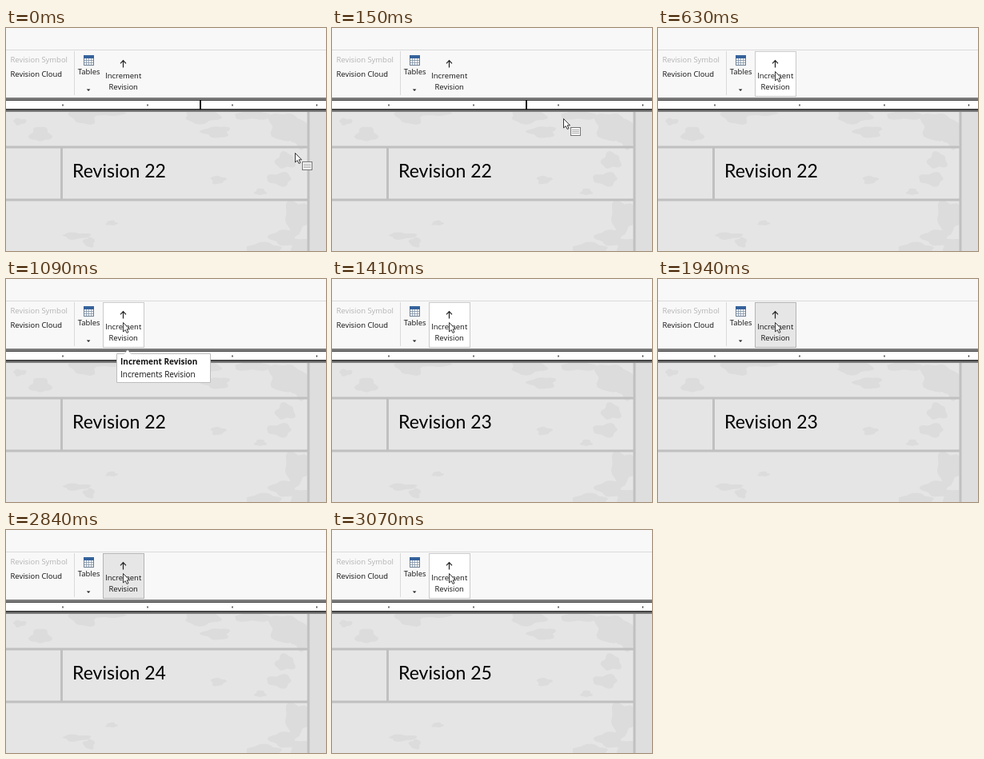
Animation, 400 px wide and 279 px high, one loop 3200 ms. Source, as an HTML page:

```html
<!DOCTYPE html>
<html lang="en">
<head>
<meta charset="utf-8">
<style>
  html, body { margin: 0; width: 100%; height: 100%; overflow: hidden; background: #f8f8f8; }
  svg { display: block; width: 100vw; height: 100vh; }
  text { font: 9.45px "Open Sans", "Noto Sans", sans-serif; fill: #111; }
  .mid { text-anchor: middle; }
  .tip text { font-size: 10px; }
  .tip .bold { font-weight: 700; }
  text.label { font: 23px Lato, "Open Sans", sans-serif; fill: #000; }
</style>
</head>
<body>
<svg viewBox="0 0 400 279">
  <defs><clipPath id="sheetClip"><rect y="105" width="377" height="174"/></clipPath></defs>

  <!-- Drawing sheet -->
  <rect y="104" width="400" height="175" fill="#e5e5e5"/>
  <rect x="379" y="104" width="21" height="175" fill="#dedede"/>
  <path id="stains" fill="#dcdcdc" clip-path="url(#sheetClip)"/>
  <path d="M0 149H378M0 215H378M69.5 149V215M378 104V279" fill="none" stroke="#c0c0c0" stroke-width="3"/>
  <text class="label" id="revision" x="83" y="187"></text>

  <!-- Toolbar -->
  <rect width="400" height="87" fill="#f8f8f8"/>
  <path d="M0 27.5H400M85.5 29V84" stroke="#dadada"/>
  <rect id="button" x="121.5" y="29.5" width="51" height="56"/>
  <text x="5.5" y="42.5" style="fill:#b4b4b4">Revision Symbol</text>
  <text x="5.5" y="61">Revision Cloud</text>
  <text class="mid" x="103.7" y="58">Tables</text>
  <text class="mid" x="146.7" y="63">Increment</text>
  <text class="mid" x="146.7" y="77">Revision</text>
  <g>
    <rect x="97.5" y="34.5" width="12" height="12" fill="#fff" stroke="#6d7f94"/>
    <rect x="97" y="34" width="13" height="4" fill="#35629b"/>
    <path d="M98 40.5H109M98 43.5H109M100.5 38V46M103.5 38V46M106.5 38V46" stroke="#8696a8" stroke-width=".8"/>
  </g>
  <path d="M100.8 76.5h4.6l-2.3 2.5z" fill="#222"/>
  <path d="M146.5 49.5V41M143 44.3L146.5 40.6L150 44.3" fill="none" stroke="#222" stroke-width="1.2"/>

  <!-- Ruler -->
  <rect y="87" width="400" height="18" fill="#7b7b7b"/>
  <rect y="90" width="400" height="13" fill="#444"/>
  <rect y="91" width="400" height="10" fill="#fff"/>
  <path d="M71 95.5v2M177 95.5v2M283 95.5v2M388.5 95.5v2" stroke="#222" stroke-width="1.3"/>
  <rect id="marker" x="242" y="90" width="2" height="12" fill="#111"/>

  <g id="tip" class="tip">
    <path d="M138.5 93.5H147.5L152 88.8L156.5 93.5H255.5V129.5H138.5Z" fill="#fff" stroke="#bdbdbd"/>
    <text class="bold" x="143" y="107">Increment Revision</text>
    <text x="143" y="122.5">Increments Revision</text>
  </g>

  <g id="cursor">
    <path d="M.5 .5V12L3.2 9.6L5.1 13.5L7 12.6L5.2 8.8H8.5Z" fill="#fff" stroke="#222" stroke-width=".9"/>
    <g id="badge">
      <rect x="9.5" y="11.5" width="12" height="10" fill="#f6f6f6" stroke="#777"/>
      <path d="M11 14.5H20M11 16.5H20M11 18.5H20" stroke="#aaa" stroke-width=".9"/>
    </g>
  </g>
</svg>
<script>
const LOOP = 3200, STEP = 30, ARRIVE = 630;
const $ = id => document.getElementById(id);
const show = (id, on) => $(id).setAttribute('visibility', on ? 'visible' : 'hidden');

// Paper stains: centre and radii, with a rippled edge.
const stains = [
  [43, 133, 13, 9], [17, 117, 8, 4], [98, 110, 17, 10], [128, 106, 20, 4],
  [245, 111, 22, 8], [263, 130, 17, 7], [308, 109, 22, 6], [350, 123, 22, 17],
  [368, 136, 12, 14], [349, 166, 12, 10], [265, 190, 9, 5], [342, 189, 15, 8],
  [318, 205, 7, 4], [88, 260, 17, 4], [104, 268, 7, 6], [132, 244, 7, 3],
  [364, 236, 16, 20], [348, 262, 17, 10], [322, 275, 22, 6], [370, 273, 16, 10]
];

function blob([x, y, rx, ry], seed) {
  const count = 26;
  return 'M' + Array.from({ length: count }, (_, i) => {
    const a = i / count * 2 * Math.PI;
    const r = 1 + .15 * Math.sin(3 * a + seed * 2.1) + .12 * Math.sin(5 * a + seed * 4.7);
    return `${(x + rx * r * Math.cos(a)).toFixed(1)} ${(y + ry * r * Math.sin(a)).toFixed(1)}`;
  }).join('L') + 'Z';
}
$('stains').setAttribute('d', stains.map(blob).join(''));

const clicks = [[1250, 1410], [1940, 2140], [2840, 3070]];

function draw(t) {
  const left = 1 - Math.min(Math.floor(t / STEP) * STEP / ARRIVE, 1);
  const x = Math.round(146 + 215 * left ** 1.5);
  const y = Math.round(54 + 102 * left ** 2);
  $('cursor').setAttribute('transform', `translate(${x} ${y})`);
  show('badge', y > 104);
  show('marker', y > 104);

  const pressed = clicks.some(([down, up]) => t >= down && t < up);
  show('button', t >= 570);
  $('button').setAttribute('fill', pressed ? '#e6e6e6' : '#fff');
  $('button').setAttribute('stroke', pressed ? '#b5b5b5' : '#cbcbcb');
  show('tip', t >= 1090 && t < 1250);
  $('revision').textContent = 'Revision ' + (22 + clicks.filter(([, up]) => t >= up).length);
}

const start = performance.now();
function tick() {
  draw((performance.now() - start) % LOOP);
  requestAnimationFrame(tick);
}
tick();
</script>
</body>
</html>
```
